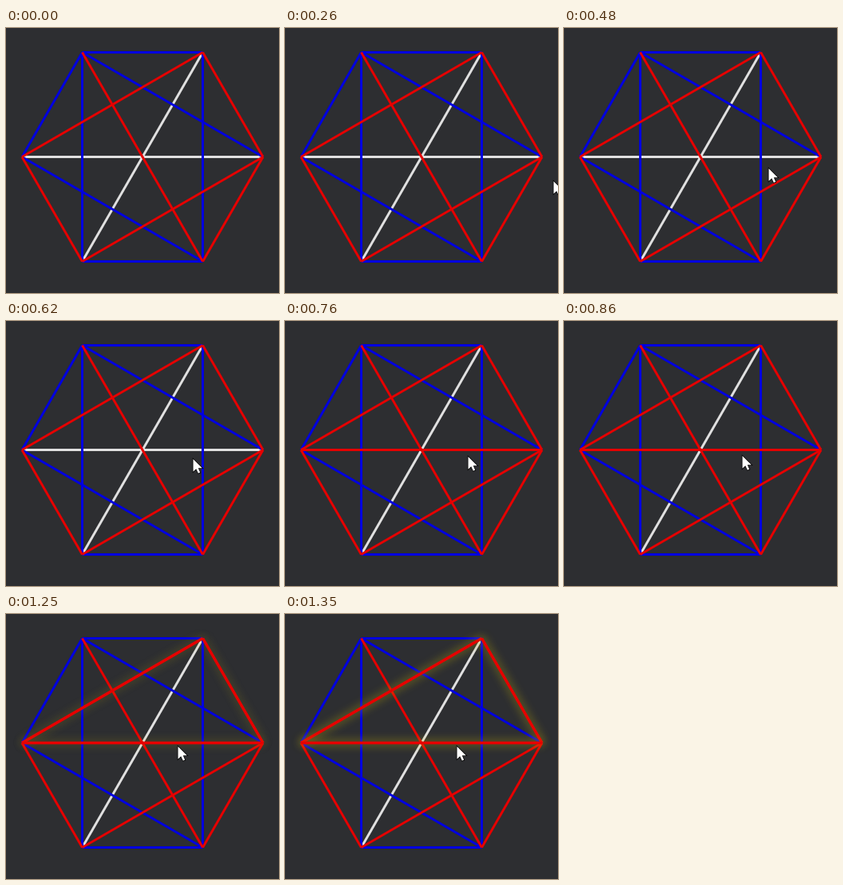
Write an HTML page with a canvas that moves like this. It is 342 px wide and 332 px high and loops after 1.75 s.

```html
<!DOCTYPE html>
<html lang="en">
<head>
<meta charset="utf-8">
<title>Hexagon colouring</title>
<style>
html, body { margin: 0; height: 100%; overflow: hidden; background: #2d2e31; }
canvas { display: block; }
</style>
</head>
<body>
<canvas id="stage" width="342" height="332"></canvas>
<script>
const ctx = document.getElementById('stage').getContext('2d');
const LOOP = 1750, STEP = 20;
const RED = '#e60000', BLUE = '#0000e0', WHITE = '#e0e0e0';

const points = {
  A: [95.5, 30.5], B: [246.5, 30.5], C: [322, 161.5],
  D: [246.5, 292.5], E: [95.5, 292.5], F: [20, 161.5]
};

// Pointer tip over time: ms, x, y
const path = [
  [260, 336, 191], [320, 308, 185], [400, 278, 179], [500, 250, 174.5],
  [620, 234, 172], [720, 234, 172], [760, 229, 169], [780, 227, 169],
  [1040, 215, 165]
];

function edges(names, color, width = 3) {
  ctx.strokeStyle = color;
  ctx.lineWidth = width;
  for (const [from, to] of names.split(' ')) {
    ctx.beginPath();
    ctx.moveTo(...points[from]);
    ctx.lineTo(...points[to]);
    ctx.stroke();
  }
}

function glow(alpha) {
  ctx.save();
  ctx.shadowColor = `rgba(205, 185, 0, ${alpha})`;
  ctx.shadowBlur = 12;
  edges('FB BC FC', RED, 3.5);
  ctx.restore();
}

function pointerAt(t) {
  const i = path.findIndex(p => p[0] > t);
  if (i < 0) return path[path.length - 1].slice(1);
  const [t0, x0, y0] = path[i - 1], [t1, x1, y1] = path[i];
  const k = (t - t0) / (t1 - t0);
  return [Math.round(x0 + (x1 - x0) * k), Math.round(y0 + (y1 - y0) * k)];
}

const arrow = new Path2D('M.5 1V16.8L4.2 13.3L6.8 18.8L9.2 17.8L6.8 12.3H11.8Z');

function drawPointer(x, y) {
  ctx.save();
  ctx.translate(x, y);
  ctx.strokeStyle = '#000';
  ctx.lineWidth = 1.5;
  ctx.stroke(arrow);
  ctx.fillStyle = '#fff';
  ctx.fill(arrow);
  ctx.restore();
}

function draw(t) {
  ctx.fillStyle = '#2d2e31';
  ctx.fillRect(0, 0, 342, 332);

  const colored = t >= 760;
  edges(colored ? 'BE' : 'BE FC', WHITE);
  edges('AB AF ED AC FD AE BD', BLUE);
  edges('BC CD FE FB EC AD', RED);
  if (colored) edges('FC', RED);

  if (t >= 1250) glow(t < 1350 ? 0.4 : 0.8);
  if (t >= 260) drawPointer(...pointerAt(t));
}

function frame() {
  const t = performance.now() % LOOP;
  draw(t - t % (t < 1240 ? STEP : 10));
  requestAnimationFrame(frame);
}
frame();
</script>
</body>
</html>
```
